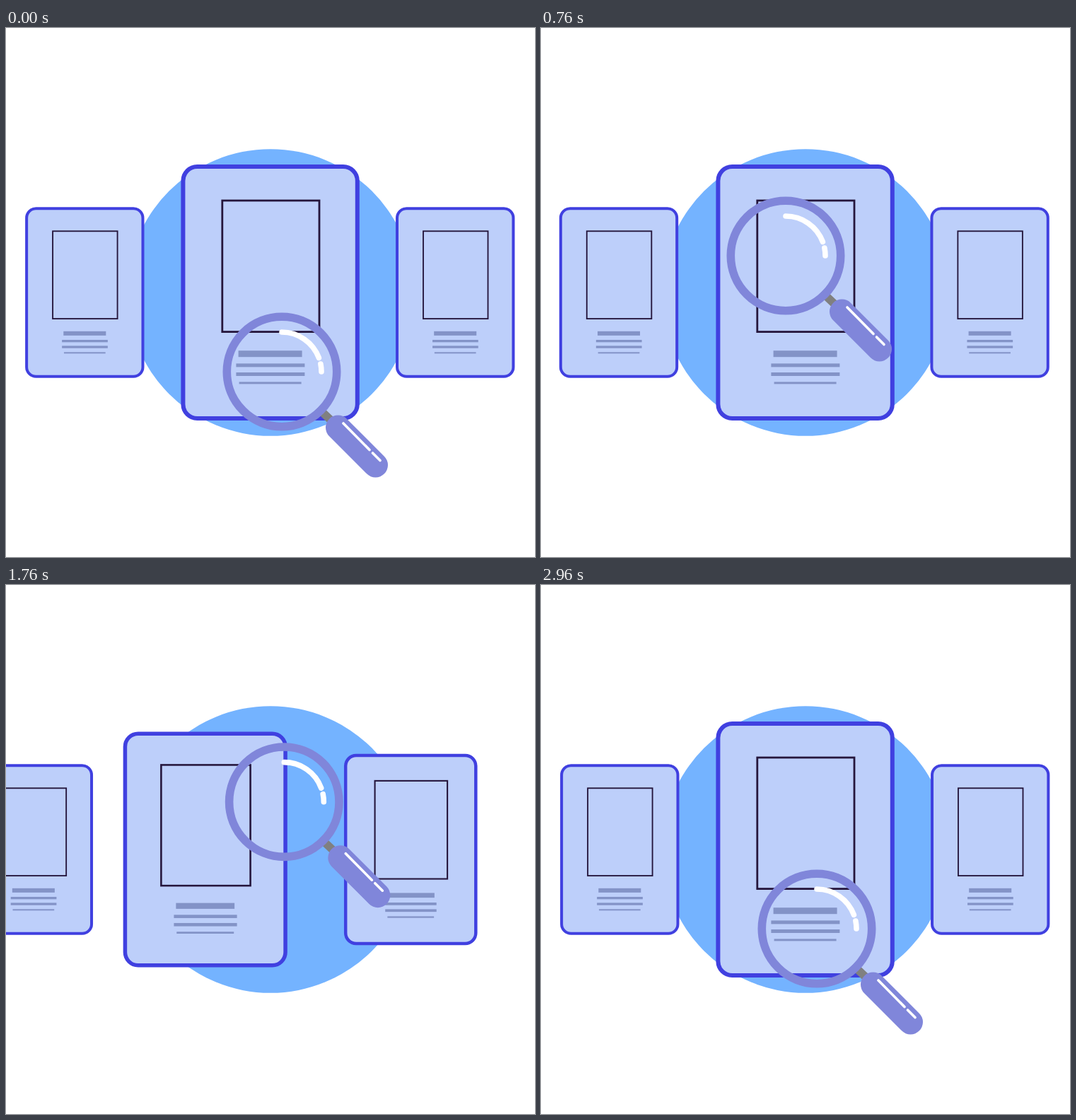
These frames come from a looping animation (748 px wide and 748 px high, 3000 ms). An HTML page:

```html
<!DOCTYPE html>
<html lang="en">
<head>
<meta charset="utf-8">
<title>Card search</title>
<style>
  html, body { margin: 0; width: 100%; height: 100%; overflow: hidden; background: #fff; }
  svg { display: block; width: 100%; height: 100%; }
  .line { fill: none; stroke-linecap: round; }
</style>
</head>
<body>
<svg viewBox="0 0 748 748">
  <defs>
    <g id="card">
      <rect x="-123.2" y="-178" width="246.4" height="356" rx="20" fill="#bdcffa" stroke="#4040e0" stroke-width="6"/>
      <rect x="-67.8" y="-130" width="137.2" height="185.6" fill="none" stroke="#25163c" stroke-width="2.8"/>
      <g fill="#8393c7">
        <rect x="-45" y="82.2" width="90" height="9"/>
        <rect x="-48.2" y="100.4" width="97" height="5"/>
        <rect x="-48.2" y="113" width="97" height="5"/>
        <rect x="-44" y="126.4" width="88" height="3"/>
      </g>
    </g>
  </defs>
  <circle cx="374" cy="374" r="202.8" fill="#74b3ff"/>
  <g id="cards">
    <use href="#card"/><use href="#card"/><use href="#card"/><use href="#card"/>
  </g>
  <g id="glass">
    <path class="line" d="M55 55L74 73" stroke="#808080" stroke-width="11.5"/>
    <circle r="77.7" fill="none" stroke="#8086da" stroke-width="11.6"/>
    <path class="line" d="M79.5 79L132.5 132" stroke="#8086da" stroke-width="35"/>
    <g class="line" stroke="#fff">
      <path d="M0 -56A56 56 0 0 1 52.4 -19.6M54.9 -11A56 56 0 0 1 56 0" stroke-width="7.6"/>
      <path d="M87 73L124 110.5M128.5 115L139 125.5" stroke-width="3.6"/>
    </g>
  </g>
</svg>
<script>
const LOOP = 3000, STEP = 40, SLIDE = 520;
const MID = 373.6, SMALL = 0.667;

// Each slide: start time, then side positions before and after it.
const HOME = { left: 111.3, right: 635.2 };
const SHIFTED = { left: 110, right: 634.6 };
const slides = [
  { start: 40, from: HOME, to: SHIFTED },
  { start: 1406, from: SHIFTED, to: HOME }
];

// Magnifier centre: time, x, y
const path = [
  [0, 390, 486], [280, 472.5, 325.5], [560, 374, 301], [760, 346, 322],
  [880, 339.5, 336], [1120, 372, 363], [1320, 391, 342], [1520, 391, 309.5],
  [1720, 396, 303], [2000, 366, 344], [2240, 344, 379], [2600, 398, 410],
  [2700, 412.5, 427], [2800, 405, 445], [2960, 390, 486]
];

const cards = document.querySelectorAll("#cards use");
const glass = document.getElementById("glass");
const mix = (a, b, p) => a + (b - a) * p;

function ease(p) {
  p = Math.min(1, Math.max(0, p));
  return p * p * (3 - 2 * p);
}

function place(card, x, scale) {
  card.setAttribute("transform", `translate(${x} 374) scale(${scale})`);
}

function drawCards(t) {
  const { start, from, to } = t < slides[1].start ? slides[0] : slides[1];
  const q = ease((t - start) / SLIDE);
  const late = q - 0.59 * q * (1 - q);
  place(cards[0], mix(to.left - 301, to.left, q), SMALL);
  place(cards[1], mix(from.left, MID, late), mix(SMALL, 1, q));
  place(cards[2], mix(MID, to.right, q), mix(1, SMALL, q));
  place(cards[3], from.right + 346 * q, SMALL);
}

// Slope through a key's neighbours; the path rests at both ends.
function slope(i, axis) {
  const a = path[i - 1], b = path[i + 1];
  return a && b ? (b[axis] - a[axis]) / (b[0] - a[0]) : 0;
}

function along(t, axis) {
  let i = path.findIndex(key => key[0] > t) - 1;
  if (i < 0) return path[path.length - 1][axis];
  const a = path[i], b = path[i + 1], d = b[0] - a[0];
  const p = (t - a[0]) / d, r = 1 - p;
  return mix(a[axis], b[axis], ease(p))
    + d * p * r * (r * slope(i, axis) - p * slope(i + 1, axis));
}

function draw(now) {
  const t = Math.floor((now % LOOP) / STEP) * STEP;
  drawCards(t);
  glass.setAttribute("transform", `translate(${along(t, 1)} ${along(t, 2)})`);
}

let origin;
function tick(now) {
  origin ??= now;
  draw(now - origin);
  requestAnimationFrame(tick);
}
draw(0);
requestAnimationFrame(tick);
</script>
</body>
</html>
```
